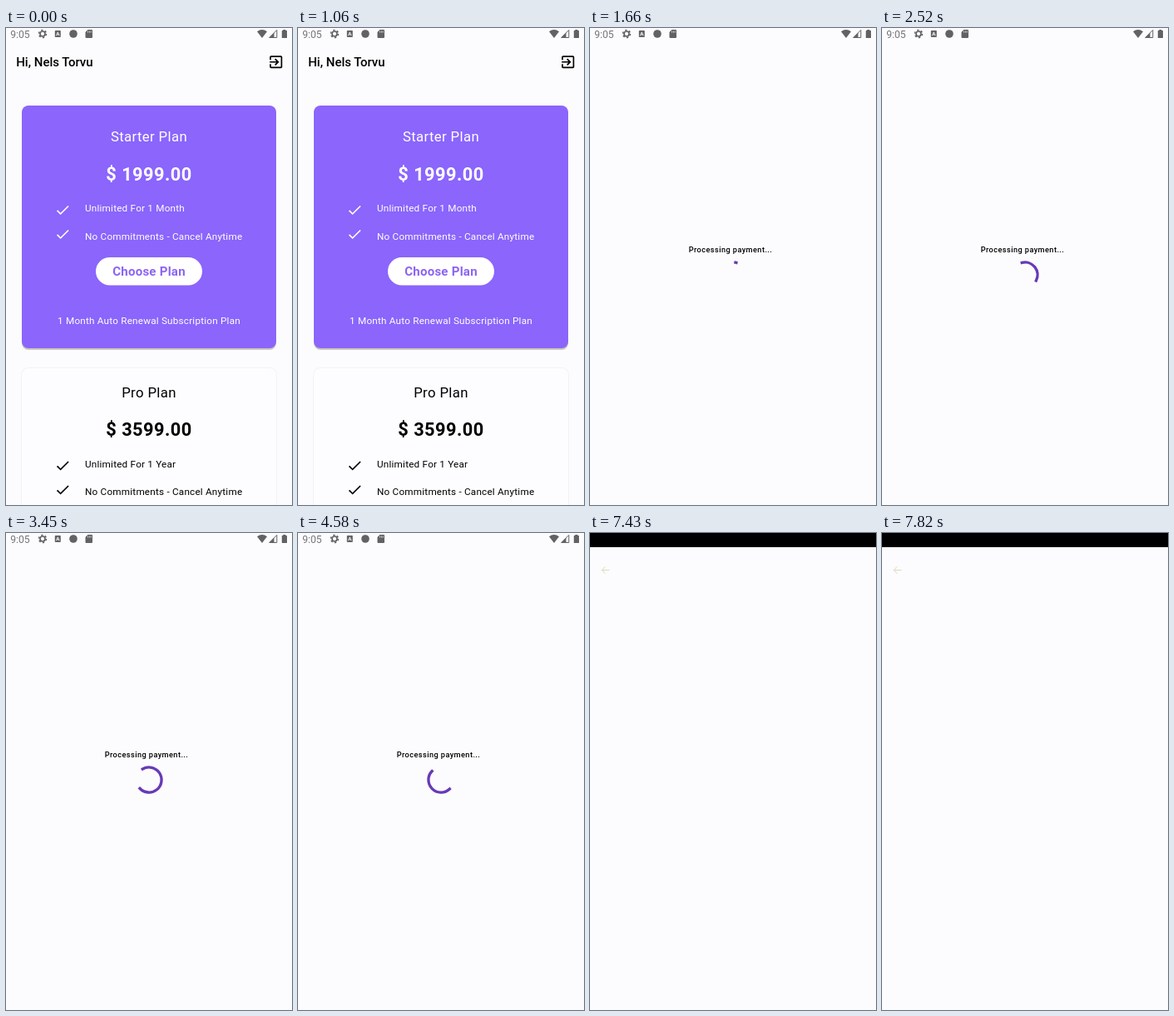
Write an HTML page that moves like this. It is 344 px wide and 572 px high and loops after 8000 ms.

```html
<!DOCTYPE html>
<html lang="en">
<head>
<meta charset="utf-8">
<title>Subscription checkout</title>
<style>
  html, body { margin: 0; width: 100%; height: 100%; overflow: hidden; background: #fcfcfe; }
  svg { display: block; width: 344px; height: 572px; font-family: Roboto, sans-serif; }
  .status { fill: #626264; }
  .line { fill: none; stroke: #626264; }
  .name { font-size: 15px; font-weight: 500; }
  .title { font-size: 16.75px; letter-spacing: .35px; text-anchor: middle; }
  .price { font-size: 21.8px; font-weight: 700; letter-spacing: .45px; text-anchor: middle; }
  .small { font-size: 11.72px; letter-spacing: .21px; }
  .mid { text-anchor: middle; }
  .button { font-size: 15.07px; font-weight: 700; letter-spacing: .22px; text-anchor: middle; fill: #8b65f4; }
  .wait { font-size: 9.2px; font-weight: 500; letter-spacing: .42px; }
</style>
</head>
<body>
<svg viewBox="0 0 344 572">
  <defs>
    <path id="check" transform="scale(.837)" d="M9 16.17L4.83 12l-1.42 1.41L9 19 21 7l-1.41-1.41z"/>
  </defs>
  <rect width="344" height="572" fill="#fcfcfe"/>

  <g id="plans">
    <text class="name" x="12.2" y="46">Hi, Nels Torvu</text>
    <path transform="translate(314.7 30.7) scale(.837)" d="M10.09 15.59L11.5 17l5-5-5-5-1.41 1.41L12.67 11H3v2h9.67l-2.58 2.59zM19 3H5c-1.11 0-2 .9-2 2v4h2V5h14v14H5v-4H3v4c0 1.1.89 2 2 2h14c1.1 0 2-.9 2-2V5c0-1.1-.9-2-2-2z"/>

    <rect x="19" y="95" width="306" height="291" rx="8" fill="#cac8be"/>
    <rect x="19" y="93" width="306" height="291" rx="8" fill="#8b65fc"/>
    <g fill="#fff">
      <text class="title" x="172" y="136">Starter Plan</text>
      <text class="price" x="172" y="183">$ 1999.00</text>
      <use href="#check" x="58.1" y="208.2"/>
      <text class="small" x="95" y="220.3">Unlimited For 1 Month</text>
      <use href="#check" x="58.1" y="237.2"/>
      <text class="small" x="95" y="254">No Commitments - Cancel Anytime</text>
      <rect x="108" y="275" width="128" height="33.5" rx="16.75"/>
      <text class="small mid" x="172" y="355">1 Month Auto Renewal Subscription Plan</text>
    </g>
    <text class="button" x="172" y="297">Choose Plan</text>

    <rect x="18.5" y="407.5" width="307" height="200" rx="8" fill="#fdfdff" stroke="#f2f2f4"/>
    <text class="title" x="172" y="443">Pro Plan</text>
    <text class="price" x="172" y="489.3">$ 3599.00</text>
    <use href="#check" x="58.1" y="514.7"/>
    <text class="small" x="95" y="526.8">Unlimited For 1 Year</text>
    <use href="#check" x="58.1" y="543.7"/>
    <text class="small" x="95" y="560">No Commitments - Cancel Anytime</text>
  </g>

  <g id="paying">
    <text class="wait" x="118.8" y="269">Processing payment...</text>
    <path id="arc" fill="none" stroke="#673ab7" stroke-width="3.35" stroke-linecap="square"/>
  </g>

  <g class="status">
    <text x="5.2" y="12" font-size="12.2" fill="#77777a">9:05</text>
    <circle class="line" cx="44" cy="7" r="3" stroke-width="1.7"/>
    <circle class="line" cx="44" cy="7" r="4.5" stroke-width="1.5" stroke-dasharray="2.3 2.412"/>
    <rect x="58.8" y="3" width="7" height="8" rx=".8"/>
    <path d="M60.5 9.2l1.8-4.3 1.8 4.3M61.1 7.8h2.4" fill="none" stroke="#fcfcfe" stroke-width=".9"/>
    <circle cx="81" cy="7" r="4.8"/>
    <path d="M98.5 2H103q1 0 1 1v8q0 1-1 1H96.5q-1 0-1-1V5z"/>
    <path d="M98.6 3.6v2M100.5 3.6v2M102.3 3.6v2" stroke="#fcfcfe" stroke-width=".7"/>
    <path d="M302 4.2Q308 -.3 314 4.2L308 12z"/>
    <path class="line" d="M316.8 11.5L325.8 2.5V11.5z"/>
    <path d="M316.3 12L322.5 5.8V12z"/>
    <path d="M333.3 2h3v1h1.2q.5 0 .5.5v8q0 .5-.5.5h-5.2q-.5 0-.5-.5v-8q0-.5.5-.5h1z"/>
  </g>

  <g id="checkout">
    <rect width="344" height="572" fill="#fcfcfe"/>
    <rect width="344" height="17" fill="#000"/>
    <path id="back" fill="none" stroke="#d8dabc" d="M23.5 44.5H14.5M18.2 40.3L14.3 44.5L18.2 48.7"/>
  </g>
</svg>
<script>
const LOOP = 8000, PAY = 1660, SPIN = 1610, FREEZE = 5700, OPEN = 5900, READY = 6030, BACK = 7430;
const RATE = .9925; // the spinner runs slightly slow
const $ = id => document.getElementById(id);
const [plans, paying, arc, checkout, back] = ['plans', 'paying', 'arc', 'checkout', 'back'].map($);
const show = (el, on) => el.setAttribute('visibility', on ? 'visible' : 'hidden');
const clamp = x => Math.min(1, Math.max(0, x));

// cubic-bezier(.4, 0, .2, 1)
function ease(x) {
  let lo = 0, hi = 1, s = .5;
  for (let i = 0; i < 24; i++) {
    s = (lo + hi) / 2;
    const bx = 1.2 * s * (1 - s) ** 2 + .6 * s * s * (1 - s) + s ** 3;
    if (bx < x) lo = s; else hi = s;
  }
  return s * s * (3 - 2 * s);
}

// Head runs ahead for half a cycle, then the tail catches up; the whole ring turns.
function spinner(ms) {
  const p = ms / 1333 % 1;
  const head = 270 * ease(clamp(p * 2)), tail = 270 * ease(clamp(p * 2 - 1));
  const from = -90 + tail + 360 * ms / 2222 + 90 * p;
  const sweep = Math.max(head - tail, .1);
  const point = deg => {
    const a = deg * Math.PI / 180;
    return `${172 + 15.07 * Math.cos(a)} ${296 + 15.07 * Math.sin(a)}`;
  };
  return `M${point(from)}A15.07 15.07 0 ${sweep > 180 ? 1 : 0} 1 ${point(from + sweep)}`;
}

function draw(t) {
  show(plans, t < PAY);
  show(paying, t >= PAY && t < READY);
  show(checkout, t >= OPEN);
  checkout.setAttribute('opacity', t < READY ? .5 : 1);
  back.setAttribute('opacity', t >= BACK ? 1 : 0);
  if (t >= PAY) arc.setAttribute('d', spinner((Math.min(t, FREEZE) - SPIN) * RATE));
}

let start;
function tick(now) {
  start ??= now;
  draw((now - start) % LOOP);
  requestAnimationFrame(tick);
}
draw(0);
requestAnimationFrame(tick);
</script>
</body>
</html>
```
